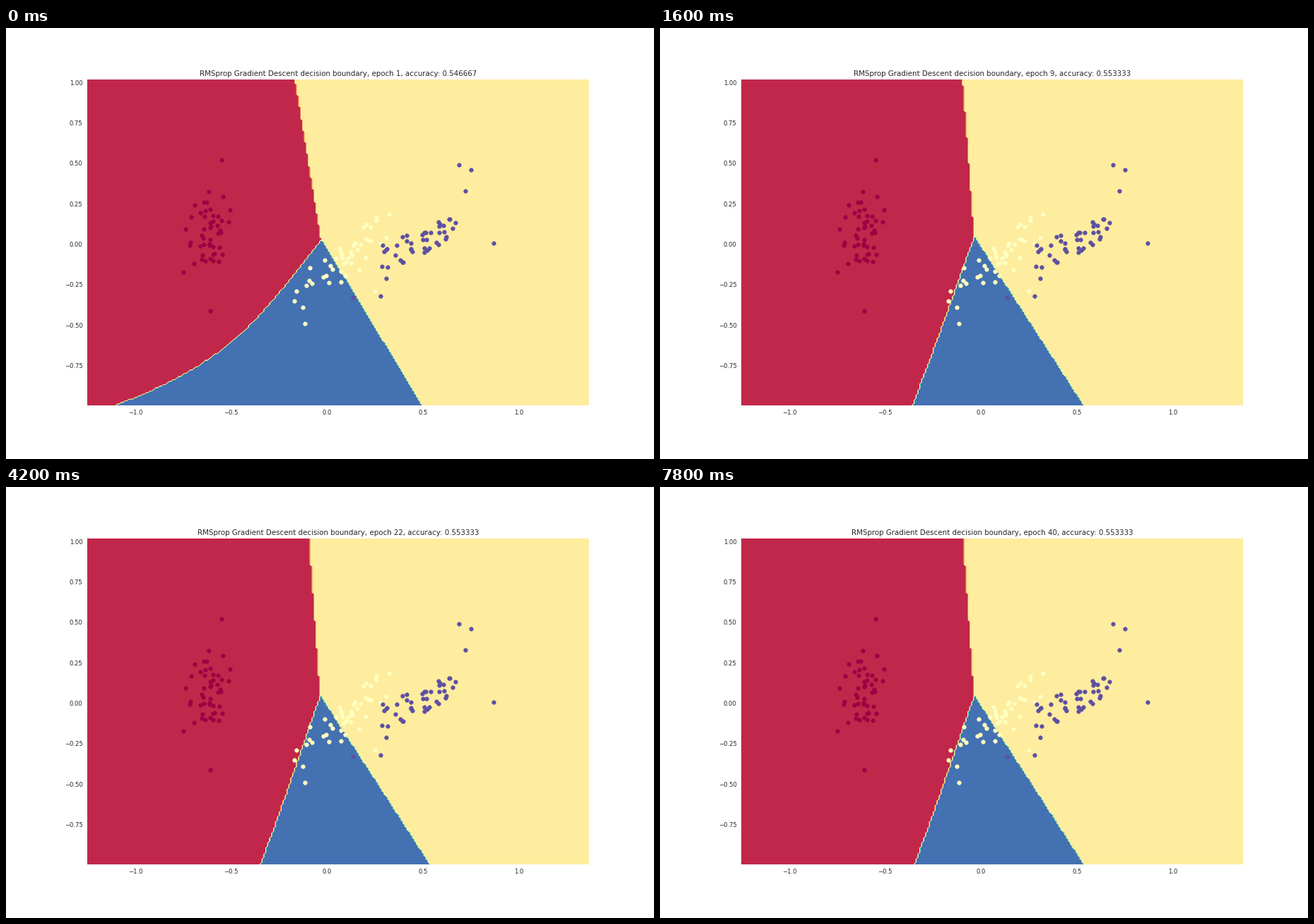
A matplotlib script that plays this animation: 917 px wide and 611 px high, repeating every 8 s.

```python
import numpy as np
import matplotlib.pyplot as plt
from matplotlib.animation import FuncAnimation

plt.rcParams["font.family"] = "DejaVu Sans"

W, H = 917, 611
DPI = W / 15
EPOCHS = 40
STEP = 0.01
INK = "#262626"
LEVELS = np.arange(9) / 4

xs = -1.252 + STEP * np.arange(263)
ys = -0.9935 + STEP * np.arange(202)
X, Y = np.meshgrid(xs, ys)
rng = np.random.default_rng(7)


def settle(epoch, start, end, speed=1):
    """Ease from the first-epoch value to the converged one."""
    return end + (start - end) * 0.64 ** (speed * (epoch - 1))


def classify(epoch):
    """Class index on the grid: three boundaries meeting at (jx, jy)."""
    top = settle(epoch, -0.1651, -0.0918)
    jx = settle(epoch, -0.0291, -0.0343)
    jy = settle(epoch, 0.0253, 0.0428)
    right = settle(epoch, 0.4928, 0.5325)
    slope = settle(epoch, 0.659, 0.291)
    bend = settle(epoch, 0.392, 0.008, speed=2)

    depth = np.maximum(jy - Y, 0)
    part = depth / (jy - ys[0])
    x_top = jx + (top - jx) * (Y - jy) / (ys[-1] - jy)
    x_left = jx - depth * (slope + bend * part ** 3.2)
    x_right = jx + (right - jx) * part
    below = np.where(X < x_left, 0, np.where(X < x_right, 2, 1))
    above = np.where(X < x_top, 0, 1)
    return np.where(Y < jy, below, above)


def cluster(center, spread, tilt, outliers, n=49):
    """Correlated random cloud plus a few fixed outliers."""
    u, v = rng.triangular(-2.3, 0, 2.3, (2, n - len(outliers)))
    v = tilt * u + np.sqrt(1 - tilt ** 2) * v
    cloud = np.column_stack([u, v]) * spread + center
    return np.vstack([cloud, outliers])


fig = plt.figure(figsize=(W / DPI, H / DPI), dpi=DPI, facecolor="white")
ax = fig.add_axes([0.125, 0.125, 0.775, 0.755])
ax.set_xlim(xs[0], xs[-1])
ax.set_ylim(ys[0], ys[-1])
ax.set_xticks(np.arange(-1, 1.1, 0.5))
ax.set_yticks(np.arange(-0.75, 1.1, 0.25))
ax.tick_params(length=0, pad=7, labelsize=10, labelcolor=INK)
for spine in ax.spines.values():
    spine.set_visible(False)
title = ax.set_title("", fontsize=12, color=INK)

low = cluster((-0.61, 0.07), (0.05, 0.15), 0.3,
              [(-0.55, 0.52), (-0.61, -0.41), (-0.75, -0.17), (-0.74, 0.095)])
mid = cluster((0.12, -0.08), (0.12, 0.12), 0.75,
              [(-0.115, -0.49), (-0.17, -0.35), (-0.16, -0.29), (0.25, -0.29)])
high = cluster((0.49, 0.03), (0.11, 0.10), 0.75,
               [(0.69, 0.49), (0.75, 0.46), (0.72, 0.33), (0.87, 0.005),
                (0.28, -0.32), (0.135, -0.33)])
for pts, color in ((low, "#9e0142"), (mid, "#ffffbf"), (high, "#5e4fa2")):
    ax.scatter(*pts.T, s=49, c=color, linewidths=0.3, edgecolors="face",
               zorder=3)

regions = None


def draw(i):
    global regions
    epoch = i + 1
    if regions is not None:
        regions.remove()
    regions = ax.contourf(X, Y, classify(epoch), levels=LEVELS,
                          cmap="Spectral", zorder=1)
    acc = (82 if epoch == 1 else 83) / 150
    title.set_text("RMSprop Gradient Descent decision boundary, "
                   f"epoch {epoch}, accuracy: {acc:.6f}")
    return ()


anim = FuncAnimation(fig, draw, frames=EPOCHS, init_func=lambda: (),
                     interval=200, repeat=True, repeat_delay=0, blit=False)
plt.show()
```
